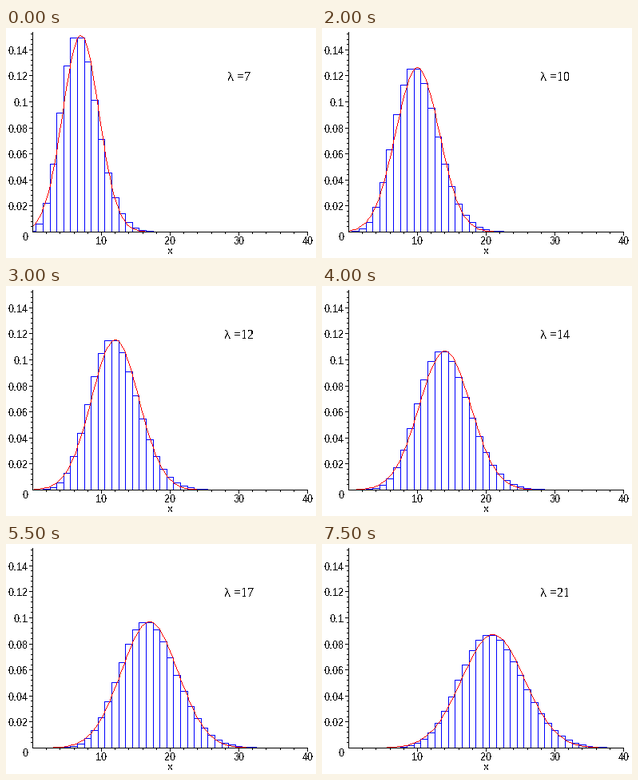
Animation, 388 px wide and 288 px high, one loop 8 s. Source, as a matplotlib script:

```python
import math

import numpy as np
import matplotlib.pyplot as plt
from matplotlib.animation import FuncAnimation

WIDTH, HEIGHT, DPI = 388, 288, 100
X0, Y0 = 33, 255              # pixel position of the plot origin
X_SCALE, Y_SCALE = 8.6, 1631  # pixels per unit
STEP_MS, FRAMES = 500, 16
PX = 72 / DPI                 # one pixel in points

plt.rcParams.update({
    "path.snap": False,
    "path.simplify": False,
    "text.antialiased": False,
    "text.hinting": "native",
    "text.hinting_factor": 1,
    "lines.antialiased": False,
    "lines.linewidth": PX,
    "lines.solid_capstyle": "butt",
    "lines.solid_joinstyle": "miter",
})

fig = plt.figure(figsize=(WIDTH / DPI, HEIGHT / DPI), dpi=DPI, facecolor="white")
ax = fig.add_axes([0, 0, 1, 1])
ax.set_xlim(0, WIDTH)
ax.set_ylim(HEIGHT, 0)
ax.axis("off")


def column(x):
    return np.floor(X0 + X_SCALE * np.asarray(x) + 0.5)


def row(y):
    return np.floor(Y0 - Y_SCALE * np.asarray(y) + 0.5)


def h_line(x_start, x_end, y):
    ax.plot([x_start, x_end + 1], [y + 0.5] * 2, color="black", zorder=4)


def v_line(x, y_start, y_end):
    ax.plot([x + 0.5] * 2, [y_start, y_end + 1], color="black", zorder=4)


def label(x, y, text, ha="center", font="Liberation Sans", size=13.33):
    return ax.text(x, y, text, ha=ha, va="baseline", family=font,
                   fontsize=size * PX, color="black", zorder=5)


def draw_axes():
    h_line(X0, 377, Y0)
    v_line(X0, 5, Y0)
    for x in range(2, 41, 2):
        v_line(column(x), Y0, Y0 + (4 if x % 10 == 0 else 2))
    for i in range(1, 39):
        major = i % 5 == 0
        y = row(i * 0.004)
        h_line(X0 - (4 if major else 2), X0, y)
        if major:
            label(28, y + 6, f"{i * 0.004:.2g}", ha="right")
    for x in (10, 20, 30, 40):
        label(column(x) + 0.5, 271, str(x))
    label(28, 266, "0", ha="right")
    label(205.5, 283, "x")


def poisson(k, lam):
    return math.exp(k * math.log(lam) - lam - math.lgamma(k + 1))


def bar_outline(lam):
    xs, ys = [], []
    for k in range(40):
        left, right = max(X0, column(k - 0.5)), column(k + 0.5)
        top = row(poisson(k, lam))
        xs += [left, left, right, right, np.nan]
        ys += [Y0, top, top, Y0, np.nan]
    return np.array(xs) + 0.5, np.array(ys) + 0.5


def normal_pixels(lam):
    """Normal density as one-pixel dashes, stepped like an unsmoothed line."""
    x = np.linspace(0, 40, 129)
    density = np.exp(-(x - lam) ** 2 / (2 * lam)) / math.sqrt(2 * math.pi * lam)
    cols, rows = column(x), row(density)
    px, py = [], []
    for i in range(len(x) - 1):
        dx, dy = cols[i + 1] - cols[i], rows[i + 1] - rows[i]
        t = np.linspace(0, 1, int(max(abs(dx), abs(dy))) + 1)
        px.append(np.floor(cols[i] + dx * t + 0.5))
        py.append(np.floor(rows[i] + dy * t + 0.5))
    px, py = np.concatenate(px), np.concatenate(py)
    gap = np.full_like(px, np.nan)
    return (np.column_stack([px, px + 1, gap]).ravel(),
            np.column_stack([py + 0.5, py + 0.5, gap]).ravel())


draw_axes()
bars, = ax.plot([], [], color="#0000ff", zorder=2)
curve, = ax.plot([], [], color="#ff0000", zorder=3)
symbol = label(277, 66, "λ", ha="left", font="Liberation Serif", size=16)
value = label(289, 66, "", ha="left", font="Liberation Serif", size=16)


def update(frame):
    lam = 7 + max(0, frame - 1)
    bars.set_data(*bar_outline(lam))
    curve.set_data(*normal_pixels(lam))
    left = 281 - 4 * len(str(lam))
    symbol.set_x(left)
    value.set_x(left + 12)
    value.set_text(f"={lam}")
    return bars, curve, symbol, value


anim = FuncAnimation(fig, update, frames=FRAMES, interval=STEP_MS,
                     repeat=True, repeat_delay=0, blit=False)
plt.show()
```
